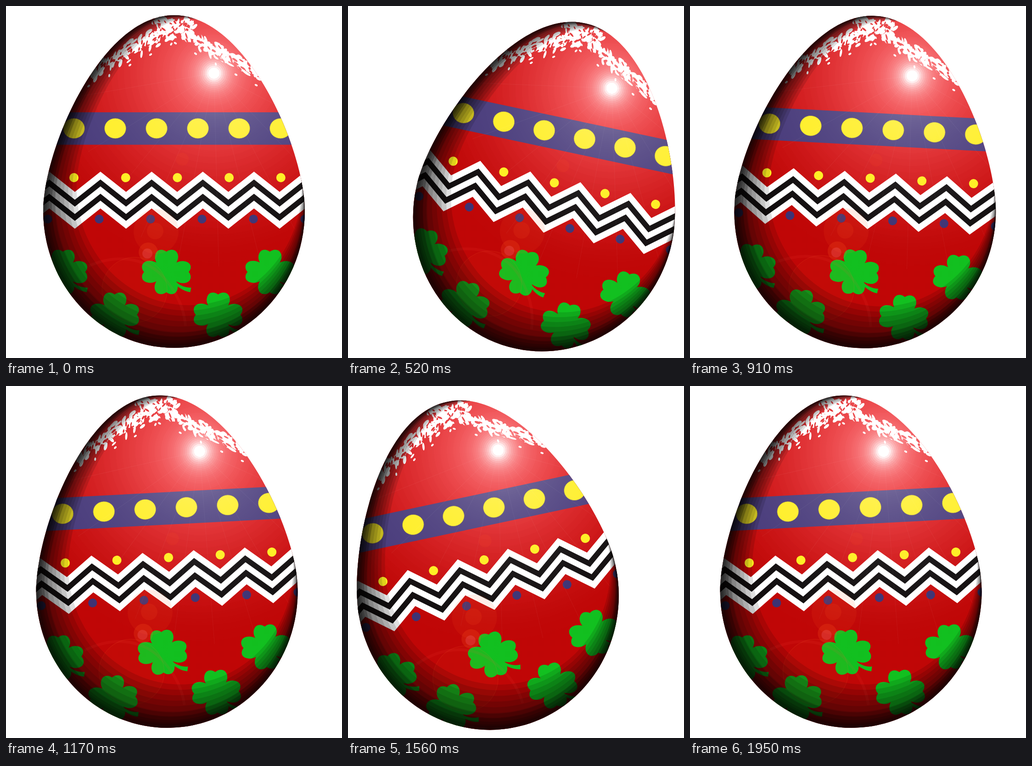
An HTML page for the animation above (2080 ms loop, 732 by 765 pixels).

```html
<!DOCTYPE html>
<html lang="en">
<head>
<meta charset="utf-8">
<title>Rocking egg</title>
<style>
html, body { margin: 0; width: 100%; height: 100%; overflow: hidden; background: #fff; }
svg { position: fixed; left: 0; top: 0; width: 100%; height: 100%; }
</style>
</head>
<body>
<svg viewBox="0 0 732 765">
  <defs>
    <clipPath id="shell"><path id="outline"/></clipPath>
    <radialGradient id="red" gradientUnits="userSpaceOnUse" cx="453" cy="146" r="420"/>
    <radialGradient id="glow" gradientUnits="userSpaceOnUse" cx="453" cy="146" r="420"/>
    <mask id="holes" maskUnits="userSpaceOnUse" x="0" y="0" width="732" height="300">
      <rect width="732" height="300" fill="#fff"/>
      <g id="gaps" fill="#000"/>
    </mask>
    <path id="leaf" d="M-9 4C-13-12-29-22-24-38C-20-51-7-50 0-44C7-50 21-51 25-38C29-22 13-12 9 4Z"/>
    <g id="clover">
      <use href="#leaf"/>
      <use href="#leaf" transform="rotate(90) scale(.95 1.1)"/>
      <use href="#leaf" transform="rotate(180)"/>
      <use href="#leaf" transform="rotate(-90) scale(.95 1.1)"/>
      <path d="M8 6C20 24 34 34 54 34L52 44C36 42 22 31 4 12Z"/>
    </g>
  </defs>
  <g id="egg" clip-path="url(#shell)">
    <rect width="732" height="765" fill="url(#red)"/>
    <rect y="231" width="732" height="70.5" fill="#433577"/>
    <g id="pattern"/>
    <g id="clovers" fill="#0cbe1a"/>
    <rect width="732" height="765" fill="url(#glow)"/>
    <g id="splash" fill="#fff" mask="url(#holes)"/>
    <g id="rays" stroke="#fff" stroke-opacity=".05"/>
    <g fill="#ff5a20">
      <circle cx="384" cy="333" r="14" opacity=".1"/>
      <circle cx="327" cy="490" r="49" opacity=".1"/>
      <circle cx="325" cy="489" r="18" opacity=".12"/>
      <circle cx="310" cy="535" r="21" opacity=".2"/>
      <circle cx="308" cy="538" r="11" fill="#ff8090" opacity=".2"/>
      <circle cx="280" cy="617" r="71" fill-opacity=".05" stroke="#ff7a30" stroke-opacity=".15"/>
      <path d="M180 565C250 535 315 550 352 600C378 634 388 662 391 695" fill="none" stroke="#ff5040" stroke-opacity=".09" stroke-width="6"/>
    </g>
    <g id="shade" fill-rule="evenodd"/>
  </g>
</svg>
<script>
const $ = id => document.getElementById(id);

function add(parent, tag, attrs) {
  const el = document.createElementNS("http://www.w3.org/2000/svg", tag);
  for (const k in attrs) el.setAttribute(k, attrs[k]);
  return parent.appendChild(el);
}

function random(seed) {
  return () => (seed = (seed * 16807) % 2147483647) / 2147483647;
}

// Egg outline scaled by s around (cx, cy)
function eggPath(s = 1, cx = 0, cy = 0) {
  const p = (x, y) => (cx + (x - cx) * s).toFixed(2) + " " + (cy + (y - cy) * s).toFixed(2) + " ";
  return "M" + p(81, 445) +
    "C" + p(81, 315) + p(205, 20) + p(366, 20) +
    "C" + p(527, 20) + p(651, 315) + p(651, 445) +
    "C" + p(651, 609.6) + p(523.4, 743) + p(366, 743) +
    "C" + p(208.6, 743) + p(81, 609.6) + p(81, 445) + "Z";
}

// Flat rings; paint(r) gives [red, green, blue, alpha]
function rings(id, radius, width, paint) {
  for (let r = 0; r < radius; r += width) {
    const [red, green, blue, alpha] = paint(r + width / 2);
    for (const edge of [r, r + width])
      add($(id), "stop", {
        offset: edge / radius,
        "stop-color": `rgb(${red} ${green} ${blue})`,
        "stop-opacity": alpha.toFixed(3)
      });
  }
}

function drawLight() {
  rings("red", 420, 14, r => {
    const f = Math.max(0, 1 - r / 380) ** 1.2;
    return [190 + 62 * f, 46 * f, 52 * f, 1].map(Math.round);
  });
  rings("glow", 420, 4, r => [
    255, 255, 255, Math.min(1, 1.1 * Math.exp(-r / 20) + 0.4 * Math.exp(-r / 150))
  ]);
  for (let a = 20; a < 190; a += 17) {
    const t = a * Math.PI / 180;
    add($("rays"), "path", { d: `M453 146l${300 * Math.cos(t)} ${420 * Math.sin(t)}` });
  }
}

function blob(parent, x, y, rx, ry, turn) {
  add(parent, "ellipse", {
    rx: rx.toFixed(1), ry: ry.toFixed(1),
    transform: `translate(${x.toFixed(1)} ${y.toFixed(1)}) rotate(${turn.toFixed(0)})`
  });
}

// Ragged paint band from (x0, y0) to (x1, y1)
function splatter(x0, y0, x1, y1, lean, rnd) {
  const n = 80;
  for (let i = 0; i <= n; i++) {
    const x = x0 + (x1 - x0) * i / n;
    const y = y0 + (y1 - y0) * i / n;
    const off = (rnd() - 0.5) * 38;
    const tilt = lean + (rnd() - 0.5) * 50;
    blob($("splash"), x + off * 0.35, y + off, 5 + rnd() * 6, 2 + rnd() * 2, tilt);
    blob($("splash"), x, y + off * 0.4, 5 + rnd() * 4, 3.5 + rnd() * 2.5, tilt + 90);
    if (i % 2) blob($("gaps"), x + off * 0.4, y - off * 0.6, 3 + rnd() * 4, 1.3 + rnd() * 1.3, tilt);
    if (i % 16 === 0) blob($("splash"), x, y + 30, 3.5, 2, tilt);
  }
}

function drawPattern() {
  const g = $("pattern");
  for (let i = 0; i < 6; i++) {
    add(g, "ellipse", { cx: 148 + 90 * i, cy: 266, rx: 23.5, ry: 22, fill: "#ffee20", stroke: "#7c6a50", "stroke-width": 0.8 });
    add(g, "circle", { cx: 148 + 112.7 * i, cy: 373, r: 10, fill: "#ffee18" });
    add(g, "circle", { cx: 91 + 112 * i, cy: 463, r: 9.6, fill: "#382d70" });
  }

  // A white zigzag with two black lines on it
  const zigzag = (top, height, fill) => {
    const edge = [];
    for (let i = 0; i < 13; i++) edge.push([38.5 + 55.75 * i, top + (i % 2 ? 0 : 44)]);
    const back = edge.map(([x, y]) => [x, y + height]).reverse();
    add(g, "polygon", { points: edge.concat(back).join(" "), fill });
  };
  zigzag(360, 80, "#fff");
  zigzag(377, 15, "#0c0809");
  zigzag(408, 15, "#0c0809");

  for (let i = 0; i < 5; i++)
    add($("clovers"), "use", { href: "#clover", x: 124 + 112.7 * i, y: i % 2 ? 671 : 578 });
}

// Banded shadow, widest at the lower left
function shadow(n, depth, cx, cy, alpha) {
  for (let i = 1; i <= n; i++)
    add($("shade"), "path", {
      d: "M0 0H732V765H0Z" + eggPath(1 - depth * i / n, cx, cy),
      "fill-opacity": alpha
    });
}

// Rocks in hard steps, following a triangle wave
const STEP = 130, COUNT = 16, TILT = 3;

function draw(now) {
  const phase = (Math.floor(now / STEP) + COUNT / 4) % COUNT;
  const angle = TILT * (COUNT / 4 - Math.abs(phase - COUNT / 2));
  $("egg").setAttribute("transform", `rotate(${angle} 358.3 741)`);
}

function loop(now) {
  draw(now);
  requestAnimationFrame(loop);
}

$("outline").setAttribute("d", eggPath());
drawLight();
drawPattern();
const rnd = random(4127);
splatter(180, 144, 405, 30, 120, rnd);
splatter(325, 28, 545, 142, 52, rnd);
shadow(8, 0.14, 600, 80, 0.12);
shadow(4, 0.05, 590, 80, 0.17);
draw(0);
requestAnimationFrame(loop);
</script>
</body>
</html>
```
